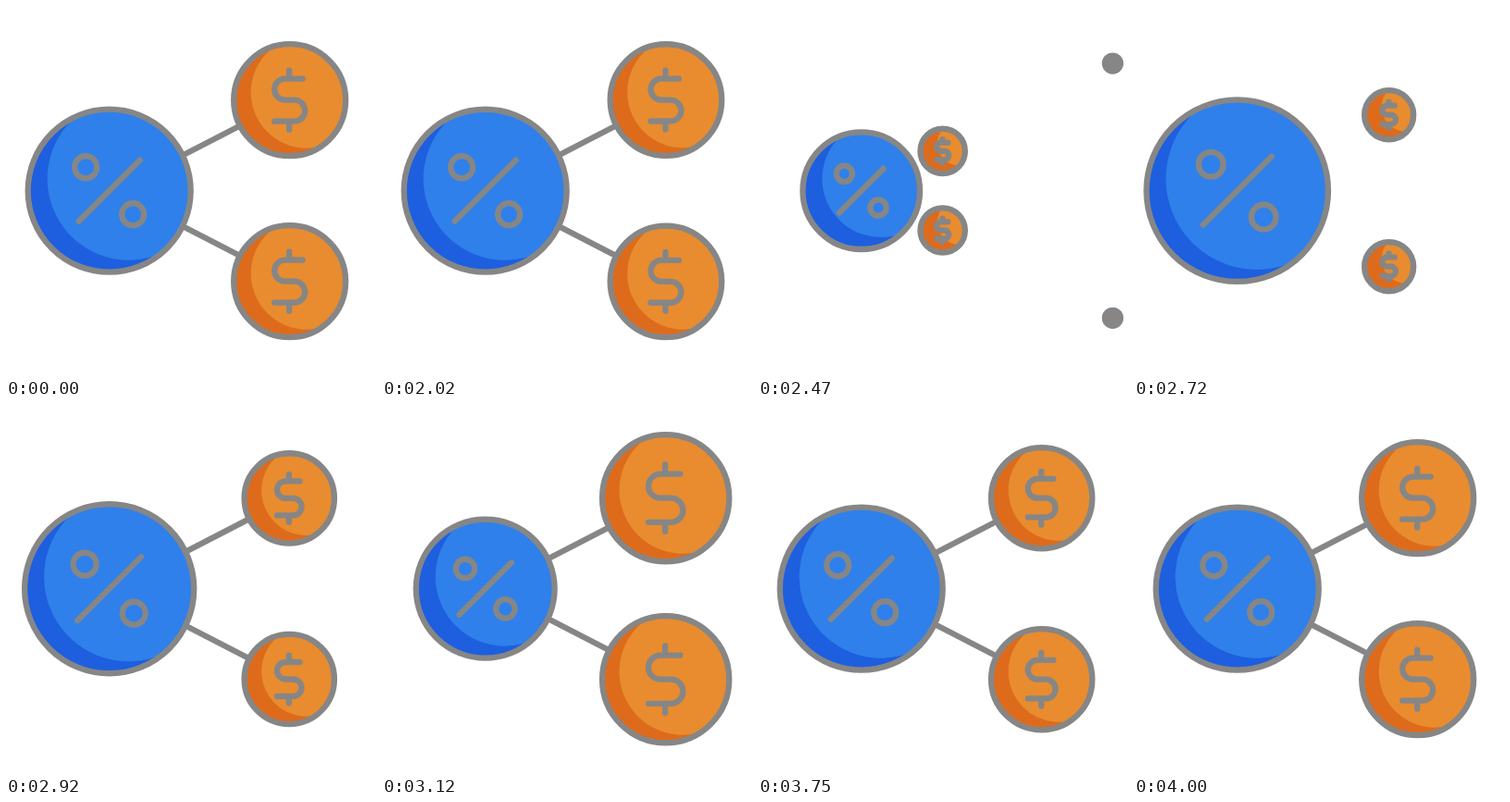
Write an HTML page that moves like this. It is 400 by 400 pixels and loops after 4.02 s.

```html
<!DOCTYPE html>
<html lang="en">
<head>
<meta charset="utf-8">
<title>Percent share</title>
<style>
  html, body { margin: 0; width: 100%; height: 100%; overflow: hidden; background: #fff; }
  svg { display: block; width: 100%; height: 100%; }
  .ink { fill: none; stroke: #868686; stroke-width: 6.3; stroke-linecap: round; stroke-linejoin: round; }
</style>
</head>
<body>
<svg id="stage" viewBox="0 0 400 400"></svg>
<script>
const LOOP = 4020, START = 2010, SWAP = 2520;
const HUB = { x: 111.7, y: 199.7, r: 88 };
const ARM = { x: 116.7, dx: 190, dy: 98 };
const COIN_R = 60.5;
const stage = document.getElementById('stage');

function add(parent, tag, attrs = {}) {
  const node = document.createElementNS('http://www.w3.org/2000/svg', tag);
  parent.append(node);
  return set(node, attrs);
}

function set(node, attrs) {
  for (const key in attrs) node.setAttribute(key, attrs[key]);
  return node;
}

function show(node, visible) {
  node.style.display = visible ? '' : 'none';
}

// Eased interpolation through [time, value] keys.
function track(t, ...keys) {
  if (t <= keys[0][0]) return keys[0][1];
  for (let i = 1; i < keys.length; i++) {
    const [t0, v0] = keys[i - 1], [t1, v1] = keys[i];
    if (t < t1) {
      const u = (t - t0) / (t1 - t0);
      return v0 + (v1 - v0) * u * u * (3 - 2 * u);
    }
  }
  return keys[keys.length - 1][1];
}

// Accelerating progress from 0 to 1 while the old coins fly off.
function departure(t) {
  return Math.min(1, Math.max(0, (t - START) / (SWAP - START))) ** 1.5;
}

// Overlap of a disc with a copy of itself moved by (dx, dy).
function lens(r, dx, dy) {
  const d = Math.hypot(dx, dy);
  if (r <= d / 2) return '';
  const h = Math.sqrt(r * r - d * d / 4) / d;
  const a = `${dx / 2 - dy * h} ${dy / 2 + dx * h}`;
  const b = `${dx / 2 + dy * h} ${dy / 2 - dx * h}`;
  return `M${a}A${r} ${r} 0 0 1 ${b}A${r} ${r} 0 0 1 ${a}Z`;
}

function percent(s) {
  const ring = c => `M${(c - 12) * s} ${c * s}a${12 * s} ${12 * s} 0 1 0 ${24 * s} 0a${12 * s} ${12 * s} 0 1 0 ${-24 * s} 0Z`;
  return `M${-33 * s} ${33 * s}L${33 * s} ${-33 * s}` + ring(-25.5) + ring(25.5);
}

function dollar(s) {
  const a = 11.5 * s;
  return `M${14 * s} ${-23 * s}H${-5 * s}a${a} ${a} 0 0 0 0 ${2 * a}H${5 * s}` +
    `a${a} ${a} 0 0 1 0 ${2 * a}H${-16.5 * s}` +
    `M${-.5 * s} ${-32 * s}V${-23 * s}M${-.5 * s} ${23 * s}V${32 * s}`;
}

function makeDisc(radius, dark, light, dx, dy, glyph) {
  const group = add(stage, 'g');
  const base = add(group, 'circle', { fill: dark });
  const lit = add(group, 'path', { fill: light });
  const sign = add(group, 'path', { class: 'ink' });
  const rim = add(group, 'circle', { class: 'ink' });
  return {
    group,
    place(x, y, scale) {
      const r = radius * scale;
      set(group, { transform: `translate(${x} ${y})` });
      set(base, { r });
      set(rim, { r });
      set(lit, { d: lens(r, dx, dy) });
      set(sign, { d: glyph(scale) });
    }
  };
}

const makeCoin = () => makeDisc(COIN_R, '#dd6b1b', '#e88c2f', 18.5, -8.5, dollar);
const sides = [-1, 1].map(dir => ({
  dir,
  line: add(stage, 'line', { class: 'ink', 'stroke-linecap': 'butt' })
}));
for (const side of sides) {
  side.incoming = makeCoin();
  side.outgoing = makeCoin();
}
const hub = makeDisc(HUB.r, '#1d5fdf', '#2f80ea', 21, -13, percent);

function render(t) {
  const leaving = t < SWAP;
  const gone = departure(t);
  const outPos = 1 + .47 * gone;
  const inPos = track(t, [2071, 0], [2945, 1]);
  const inScale = track(t, [2650, .4], [3165, 1.15], [3530, .822], [4000, 1]);
  const from = leaving ? track(t, [START, 0], [2440, 1.42]) : 0;
  const to = leaving ? outPos : track(t, [2650, 0], [3000, 1]);

  for (const { dir, line, incoming, outgoing } of sides) {
    const at = k => [ARM.x + ARM.dx * k, HUB.y + dir * ARM.dy * k];
    const [x1, y1] = at(from), [x2, y2] = at(to);
    set(line, { x1, y1, x2, y2 });
    show(line, to > from);
    show(incoming.group, t > 2071);
    incoming.place(...at(inPos), inScale);
    show(outgoing.group, leaving);
    outgoing.place(...at(outPos), 1 - gone);
  }
  hub.place(HUB.x, HUB.y,
    track(t, [START, 1], [SWAP, .712], [2762, 1.15], [3155, .845], [3687, 1]));
}

const began = performance.now();
function tick() {
  render((performance.now() - began) % LOOP);
  requestAnimationFrame(tick);
}
tick();
</script>
</body>
</html>
```
